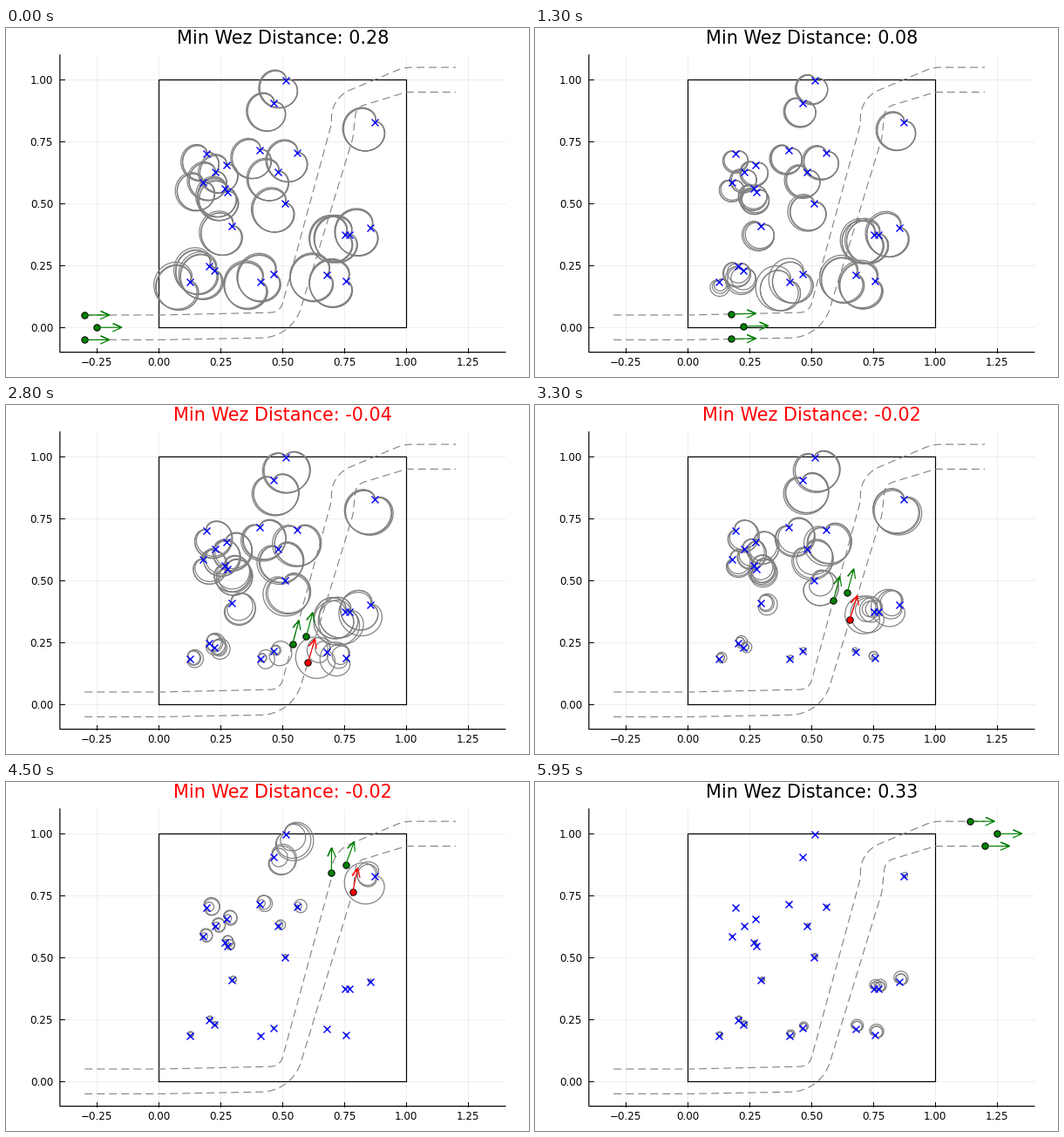
Write a matplotlib script that moves like this. It is 600 px wide and 400 px high and loops after 6 s.

```python
import numpy as np
import matplotlib.pyplot as plt
from matplotlib.animation import FuncAnimation
from matplotlib.collections import LineCollection

W, H, DPI = 600, 400, 100
FRAMES, INTERVAL = 120, 50
UNIT = 283.9                # pixels per data unit
OX, OY = 175.4, 343.2       # data origin on the stage
XLIM, YLIM = (-0.4, 1.4), (-0.1, 1.1)
PX = 72 / DPI               # points per pixel
DOT = 1 / UNIT              # one pixel in data units

REACH = 0.15                # head-on engagement range
ARROW, BARB = 0.1, (10 * DOT, 4.5 * DOT)
TURN, SPREAD = 0.11, 0.06   # bend radius of the leader, change on either side
WAIT, BEND = 0.055, (42, 56)

plt.rcParams["font.family"] = "DejaVu Sans"

# Waypoints of the three agents, keyed by side: left, leader, right
ROUTES = {
    1: [(-0.3, 0.05), (0, 0.05), (0.49, 0.061), (0.697, 0.82),
        (0.698, 0.927), (0.99, 1.05), (1.2, 1.05)],
    0: [(-0.25, 0), (0, 0), (0.522, 0.01), (0.75, 0.835),
        (0.75, 0.896), (1, 1), (1.25, 1)],
    -1: [(-0.3, -0.05), (0, -0.05), (0.538, -0.04), (0.784, 0.765),
         (0.797, 0.888), (1, 0.95), (1.2, 0.95)],
}

PURSUERS = np.array([
    (.512, .999), (.464, .906), (.872, .829), (.193, .702), (.272, .656),
    (.2265, .626), (.177, .584), (.268, .561), (.276, .547), (.408, .716),
    (.557, .704), (.4815, .628), (.508, .501), (.296, .408), (.202, .249),
    (.2235, .228), (.124, .1855), (.4095, .184), (.462, .215), (.677, .2135),
    (.756, .188), (.751, .375), (.7705, .375), (.8545, .4015)])


def round_off(points, side):
    """Polyline with arcs at its corners: tighter inside a turn, wider outside."""
    pts = np.array(points, float)
    legs = np.diff(pts, axis=0)
    size = np.hypot(*legs.T)
    dirs = legs / size[:, None]
    out = [pts[:1]]
    for i, p in enumerate(pts[1:-1]):
        u, v = dirs[i], dirs[i + 1]
        turn = np.arctan2(u[0] * v[1] - u[1] * v[0], u @ v)
        sign, half = np.sign(turn), np.tan(abs(turn) / 2)
        cut = min((TURN - sign * side * SPREAD) * half,
                  0.75 * min(size[i], size[i + 1]))
        a = np.linspace(0, abs(turn), 16)[:, None]
        normal = sign * np.array([-u[1], u[0]])
        out.append(p - cut * u
                   + cut / half * (np.sin(a) * u + (1 - np.cos(a)) * normal))
    return np.concatenate(out + [pts[-1:]])


def arc_length(path):
    return np.r_[0, np.cumsum(np.hypot(*np.diff(path, axis=0).T))]


def fly(path, side):
    """Position and unit heading for every time step."""
    arc = arc_length(path)
    t = np.arange(FRAMES)
    s = speed * t
    if side > 0:            # the inner agent holds back in the first bend
        s = s - WAIT * np.clip((t - BEND[0]) / (BEND[1] - BEND[0]), 0, 1)
    s = np.minimum(s, arc[-1])

    def at(d):
        return np.column_stack([np.interp(d, arc, c) for c in path.T])

    step = at(s + 0.002) - at(s - 0.002)
    return at(s), step / np.hypot(*step.T)[:, None]


paths = {side: round_off(pts, side) for side, pts in ROUTES.items()}
speed = arc_length(paths[0])[-1] / (FRAMES - 1)
flights = [fly(path, side) for side, path in paths.items()]

fig = plt.figure(figsize=(W / DPI, H / DPI), dpi=DPI, facecolor="white")
ax = fig.add_axes([0, 0, 1, 1])
ax.set_xlim(-OX * DOT, (W - OX) * DOT)
ax.set_ylim((OY - H) * DOT, OY * DOT)
ax.axis("off")


def line(x, y, color="black", width=1.0, **kw):
    return ax.plot(x, y, color=color, lw=width * PX, **kw)[0]


def text(x, y, s, size, ha="center"):
    return ax.text(x, y, s, fontsize=size * PX, ha=ha, va="baseline")


def label(v):
    return f"{v:.2f}".replace("-", "\u2212")


# Grid, ticks and axes
(x0, x1), (y0, y1) = XLIM, YLIM
for v in np.arange(-0.25, 1.3, 0.25):
    line([v, v], YLIM, width=0.6, alpha=0.1, zorder=0)
    line([v, v], [y0, y0 + 5 * DOT])
    text(v, (OY - 387.4) * DOT, label(v), 11.9)
for v in np.arange(0, 1.1, 0.25):
    line(XLIM, [v, v], width=0.6, alpha=0.1, zorder=0)
    line([x0, x0 + 5 * DOT], [v, v])
    text((54 - OX) * DOT, v - 4.4 * DOT, label(v), 11.9, ha="right")
line([x0, x0, x1], [y1, y0, y0], width=1.2, snap=False)

# Region and planned paths
line([0, 1, 1, 0, 0], [0, 0, 1, 1, 0], width=1.2)
for side in (1, -1):
    line(*paths[side].T, color="gray", width=1.1, zorder=2,
         dashes=(9 / 1.1, 5 / 1.1), dash_capstyle="butt")

zones = LineCollection([], colors="gray", linewidths=1.2 * PX, zorder=3)
ax.add_collection(zones)
ax.plot(*PURSUERS.T, "x", color="blue", ms=8 * PX, mew=1.4 * PX, zorder=4)

arrows, dots = [], []
for _ in flights:
    arrows.append(line([], [], width=1.2, zorder=6, solid_joinstyle="miter"))
    dots.append(ax.plot([], [], "o", ms=7.4 * PX, mec="black", mew=PX,
                        zorder=5)[0])
title = text(0.5, (OY - 18.4) * DOT, "", 20.8)

phi = np.linspace(0, 2 * np.pi, 73)


def engage(pos, head):
    """Cardioids facing the agent and its smallest margin to any of them."""
    los = PURSUERS - pos
    dist = np.hypot(*los.T)
    reach = REACH / 2 * (1 + los @ head / dist)
    ang = np.arctan2(-los[:, 1], -los[:, 0])[:, None] + phi
    rho = reach[:, None] / 2 * (1 + np.cos(phi))
    shapes = np.stack([PURSUERS[:, :1] + rho * np.cos(ang),
                       PURSUERS[:, 1:] + rho * np.sin(ang)], axis=-1)
    return shapes, (dist - reach).min()


def update(i):
    shapes, margins = [], []
    for (pos, head), arrow, dot in zip(flights, arrows, dots):
        p, h = pos[i], head[i]
        s, margin = engage(p, h)
        shapes.extend(s)
        margins.append(margin)
        color = "red" if margin < 0 else "green"
        tip = p + ARROW * h
        back, side = tip - BARB[0] * h, BARB[1] * np.array([-h[1], h[0]])
        arrow.set_data(*np.array([p, tip, back + side, tip, back - side]).T)
        arrow.set_color(color)
        dot.set_data([p[0]], [p[1]])
        dot.set_markerfacecolor(color)
    low = min(margins)
    zones.set_segments(shapes)
    title.set_text(f"Min Wez Distance: {round(float(low), 2)}")
    title.set_color("red" if low < 0 else "black")
    return [zones, title, *arrows, *dots]


anim = FuncAnimation(fig, update, frames=FRAMES, interval=INTERVAL,
                     repeat=True, repeat_delay=0, blit=False)
plt.show()
```
